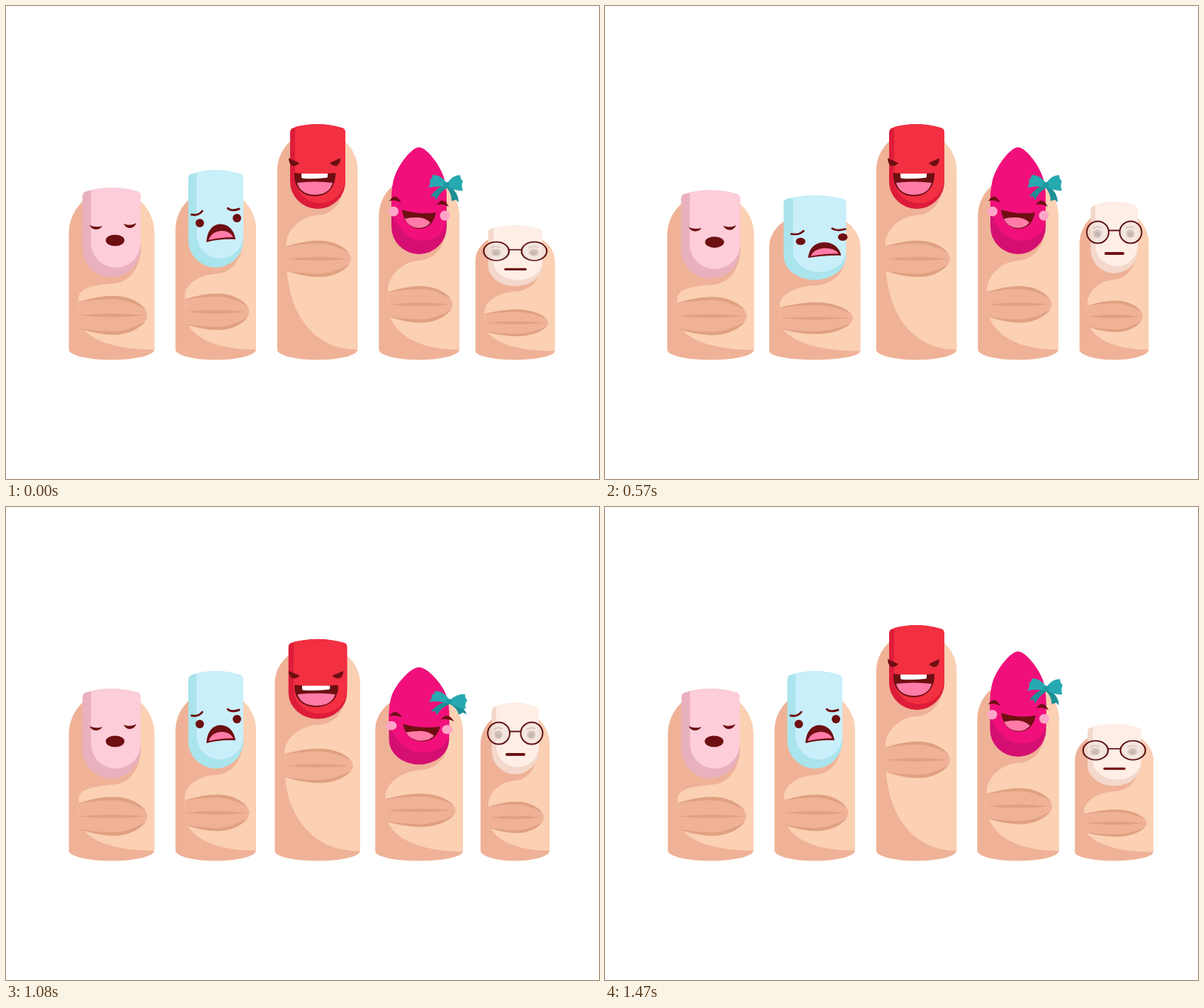
Write an HTML page that moves like this. It is 837 px wide and 669 px high and loops after 1500 ms.

```html
<!DOCTYPE html>
<html lang="en">
<head>
<meta charset="utf-8">
<title>Bouncing fingers</title>
<style>
  html, body { margin: 0; width: 100%; height: 100%; overflow: hidden; background: #fff; }
  svg { display: block; width: 100%; height: 100%; }
  .ink { fill: #6e0f12; }
  .line { fill: none; stroke: #6e0f12; stroke-width: 3; stroke-linecap: round; }
  .tongue { fill: #ff7ba8; }
</style>
</head>
<body>
<svg id="stage" viewBox="0 0 837 669"></svg>
<script>
const LOOP = 1500, STEP = 30, BEAT = 300, SQUASH = 0.149, SLIDE = 5.5, FLOOR = 500;
const stage = document.getElementById('stage');

const path = (d, attrs) => `<path d="${d}" ${attrs}/>`;
const ink = d => path(d, 'class="ink"');
const line = d => path(d, 'class="line"');
const tongue = d => path(d, 'class="tongue"');
const dot = (x, y, r, fill) => `<circle cx="${x}" cy="${y}" r="${r}" fill="${fill}"/>`;

// cx, hw: centre and half width; cy: centre of the round tip; n: nail bottom; k: knuckle height
function finger({ cx, hw, cy, n, k }) {
  const left = cx - hw, right = cx + hw, base = 486;
  const x0 = cx - hw * 0.77, x1 = cx + hw * 0.835, mid = cx + hw * 0.03, h = hw * 0.455;
  const edge = cx + hw * 0.69;
  const crease = s =>
    `M${x0} ${k + s * h * 0.66}Q${x0 + h} ${k + s * h} ${mid} ${k + s * h}Q${x1 - h * 0.7} ${k + s * h} ${x1 - 2} ${k + s * h * 0.3}` +
    `Q${x1 - h} ${k + s * h * 0.83} ${mid} ${k + s * h * 0.83}Q${x0 + h} ${k + s * h * 0.83} ${x0} ${k + s * h * 0.66}Z`;
  return path(`M${left} ${base}V${cy}A${hw} ${hw} 0 0 1 ${right} ${cy}V${base}A${hw} 14.6 0 0 1 ${left} ${base}Z`, 'fill="#efb297"') +
    path(`M${edge} ${n - 45}C${edge} ${n - 12} ${cx + hw * 0.4} ${n + 8} ${cx} ${n + 9}` +
      `C${cx - hw * 0.5} ${n + 11} ${x0} ${k - h - 10} ${x0} ${k - h * 0.86}V${k}` +
      `C${x0} ${k + 0.6 * (base - k)} ${cx - hw * 0.1} ${base} ${right} ${base}` +
      `V${cy}A${hw} ${hw} 0 0 0 ${cx} ${cy - hw}Z`, 'fill="#fbd0b3"') +
    path(`M${x0} ${k - h * 0.7}Q${x0 + h} ${k - h} ${mid} ${k - h}C${x1 - h * 0.7} ${k - h} ${x1} ${k - h * 0.4} ${x1} ${k}` +
      `C${x1} ${k + h * 0.4} ${x1 - h * 0.7} ${k + h} ${mid} ${k + h}Q${x0 + h} ${k + h} ${x0} ${k + h * 0.66}Z`, 'fill="#efb297"') +
    path(crease(-1) + crease(1) + `M${x0 + 1} ${k}Q${mid} ${k - 5} ${x1 - 4} ${k}Q${mid} ${k + 5} ${x0 + 1} ${k}Z`, 'fill="#dfa181"');
}

// s: where the side shade ends; lb: bottom of the lit area
function nail(l, r, t, b, s, lb, shade, light) {
  const m = (l + r) / 2, w = (r - l) / 2, q = (r - s) / 2;
  const corner = `${r - 6} ${t + 5}Q${r} ${t + 6} ${r} ${t + 12}`;
  return path(`M${l} ${t + 12}Q${l} ${t + 6} ${l + 6} ${t + 5}Q${m} ${t - 5} ${corner}V${b - w}A${w} ${w} 0 0 1 ${l} ${b - w}Z`, `fill="${shade}"`) +
    path(`M${s} ${t + 4}Q${m} ${t - 4} ${corner}V${lb - q}A${q} ${q} 0 0 1 ${s} ${lb - q}Z`, `fill="${light}"`);
}

const pointedNail = (bottom, fill) => path(
  `M583 200C593 200 612 224 618 243Q622 257 622 275V${bottom}V275Q544 257 548 243C554 224 573 200 583 200Z`,
  `fill="${fill}"`);

const lens = x =>
  `<circle cx="${x}" cy="320" r="15.5" fill="#efe3dd" fill-opacity=".7" stroke="#5e1113" stroke-width="2"/>` +
  dot(x - 0.5, 322, 6, '#d5c6bf') + dot(x - 0.5, 323, 3.5, '#c8b8b1') +
  path(`M${x - 7} 315q6 -5 12 -1`, 'fill="none" stroke="#d5c6bf" stroke-width="2"');

// Each bow part turns around the knot by its own angle.
const bowPart = (turn, fill, d) => path(d, `class="bow" data-turn="${turn}" fill="${fill}"`);
const bow =
  bowPart(5, '#1e8f97', 'M620 253Q607 257 599 270L605 269L607 275Q612 263 623 257Z') +
  bowPart(-24, '#1e8f97', 'M621 256Q629 264 629 276L635 274L639 278Q639 264 626 254Z') +
  bowPart(13, '#27a9b1', 'M622 250Q613 238 602 239Q602 244 598 246Q600 251 596 257Q607 254 620 256Z') +
  bowPart(13, '#27a9b1', 'M623 250Q631 239 641 239Q641 244 645 248Q642 253 645 261Q634 262 624 256Z') +
  dot(622, 253, 4, '#1e9aa2');

const fingers = [
  { cx: 149, hw: 60.3, cy: 321, n: 384, k: 437.5, art:
    nail(108, 190, 257, 384, 120, 370, '#e9b1bd', '#fdcdd9'), face:
    ink('M118 310Q127 314 136 311Q133 316 127 316Q121 316 118 310ZM166 308Q175 312 184 307Q181 314 175 314Q169 314 166 308Z') +
    '<ellipse class="ink" cx="154" cy="331.5" rx="13.2" ry="8"/>' },
  { cx: 296, hw: 56.7, cy: 316, n: 370, k: 432.5, art:
    nail(257.3, 335, 232, 370, 269, 357, '#aae4ec', '#c9effb'), face:
    line('M262 295Q272 297 277 290M313 286Q318 291 329 287') +
    dot(273.5, 307, 6, '#6e0f12') + dot(326, 300, 6, '#6e0f12') +
    ink('M283 334C284 316 293 308.5 303 308.5C315 308.5 322 318 324 330Q303 329 283 334Z') +
    tongue('M286 331Q290 319 304 318Q316 318 321 327Q303 327 286 331Z') },
  { cx: 439.5, hw: 56.7, cy: 233, n: 287, k: 357.5, art:
    nail(401, 479, 167, 287, 408, 279, '#dd1c3a', '#f23041'), face:
    ink('M399 215L414 222Q410 227 404 226Q399 223 399 215ZM472 215L457 222Q461 227 467 226Q472 223 472 215Z') +
    ink('M407 236Q436 239 465 236C466 255 455 269 436 269C416 269 406 255 407 236Z') +
    path('M417 237H454V241Q454 243 451 243Q436 245 420 244Q417 244 417 241Z', 'fill="#fff"') +
    tongue('M411 250Q436 247 461 250C458 262 448 267 436 267C424 267 414 262 411 250Z') },
  { cx: 583, hw: 56.7, cy: 297, n: 351, k: 422, art:
    pointedNail('312A39 39 0 0 1 544 312', '#d50f72') +
    pointedNail('300C622 320 606 332 588 332C566 332 549 312 544 285', '#f1107b') +
    dot(547, 290.5, 7, '#ffa5c8') + dot(619.5, 296.5, 7, '#ffa5c8') + bow, face:
    ink('M541 276Q549 262 558 278Q549 273 541 276ZM608 281Q617 268 625 284Q617 279 608 281Z') +
    ink('M559 288Q583 296 607 292C604 308 594 316 582 315C569 314 561 303 559 288Z') +
    tongue('M563 301Q568 313 582 314Q594 314 599 306Q590 298 578 299Q570 299 563 301Z') },
  { cx: 718.5, hw: 48.7, cy: 336, n: 378, k: 439, art:
    nail(685.5, 752, 277, 378, 692, 368, '#f3d8cb', '#feeee6') +
    lens(695.5) + lens(742) +
    path('M711 317.5H726.5', 'stroke="#5e1113" stroke-width="2"') +
    path('M707 350H731', 'class="line" style="stroke-width:4"'), face: '' },
];

stage.innerHTML = fingers.map(f => `<g>${finger(f)}${f.art}<g class="face">${f.face}</g></g>`).join('');
const groups = [...stage.children];
const faces = [...stage.querySelectorAll('.face')];
const bowParts = [...stage.querySelectorAll('.bow')];

// Linear press and release, one beat each, one finger after the other.
function press(index, time) {
  const local = (time - index * BEAT + LOOP) % LOOP;
  return Math.max(0, 1 - Math.abs(local / BEAT - 1));
}

function draw(now) {
  const time = Math.floor((now % LOOP) / STEP) * STEP;
  groups.forEach((group, i) => {
    const amount = press(i, time), squash = SQUASH * amount, { cx } = fingers[i];
    group.setAttribute('transform',
      `translate(${cx} ${FLOOR}) scale(${1 + squash} ${1 - squash}) translate(${-cx} ${-FLOOR})`);
    faces[i].setAttribute('transform', `translate(${SLIDE * amount} 0)`);
  });
  const bend = press(3, time);
  bowParts.forEach(part => part.setAttribute('transform', `rotate(${part.dataset.turn * bend} 622 253)`));
}

let start;
function tick(now) {
  start ??= now;
  draw(now - start);
  requestAnimationFrame(tick);
}
draw(0);
requestAnimationFrame(tick);
</script>
</body>
</html>
```
